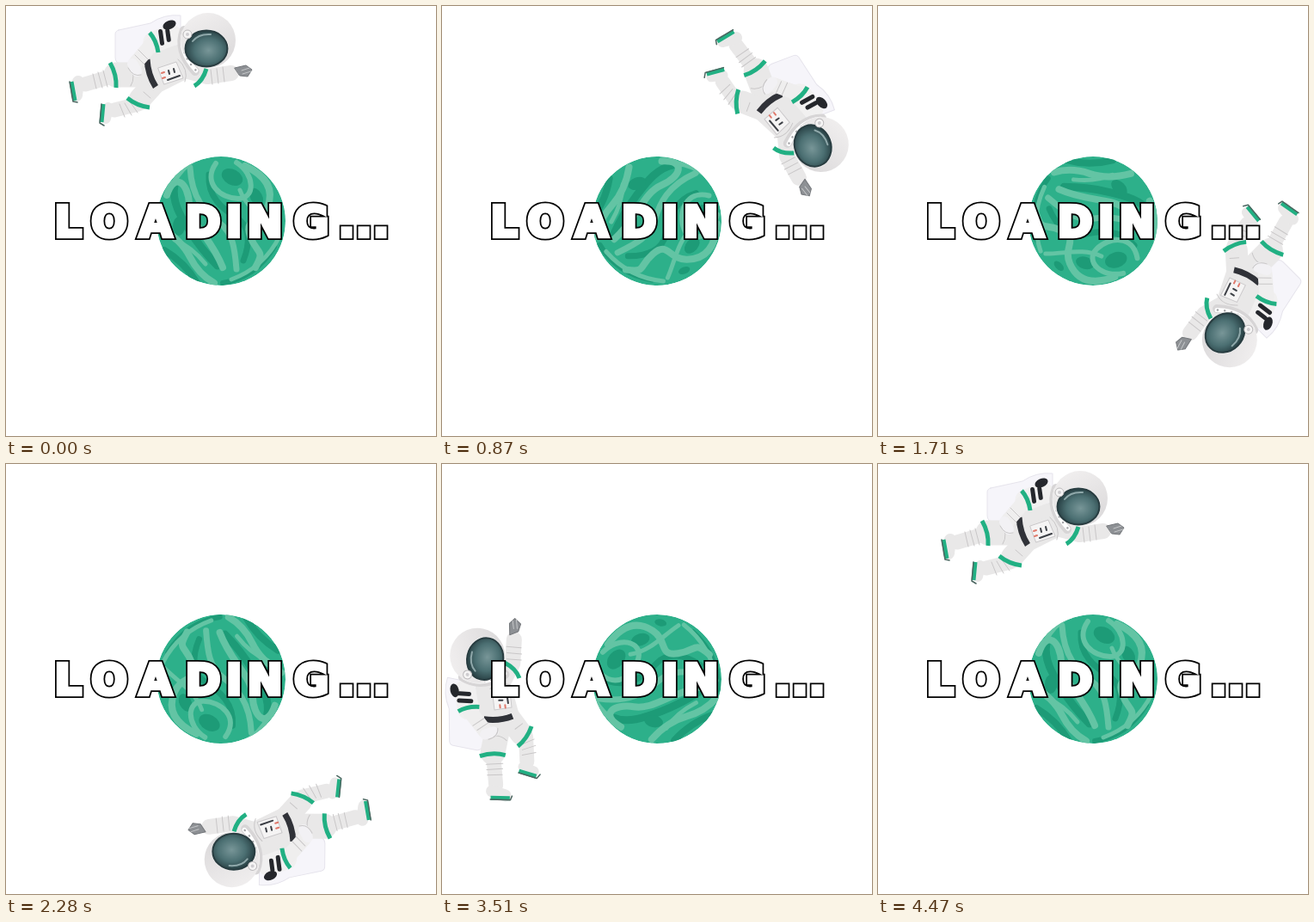
An HTML page for the animation above (4.5 s loop, 500 by 500 pixels).

```html
<!DOCTYPE html>
<html lang="en">
<head>
<meta charset="utf-8">
<title>Loading</title>
<style>
  html, body { margin: 0; width: 100%; height: 100%; overflow: hidden; background: #fff; }
  svg { display: block; width: 100%; height: 100%; }
  path, line { fill: none; stroke-linecap: round; stroke-linejoin: round; }
  text { font: bold 49px "DejaVu Sans", sans-serif; text-anchor: middle; stroke-linejoin: miter; }
  .light path { stroke: #63c4a4; }
  .dark path { stroke: #1d9b77; }
  .dark ellipse { fill: #1d9b77; }
  .suit path { stroke: #e9e8e8; }
  .shade path { stroke: #c9c7c8; stroke-width: 1; }
  .band path { stroke: #21b083; stroke-width: 5; stroke-linecap: butt; }
  .black { fill: #25272c; }
</style>
</head>
<body>
<svg viewBox="0 0 500 500">
  <defs>
    <clipPath id="disc"><circle cx="250" cy="250" r="75"/></clipPath>
    <radialGradient id="glass" cx=".55" cy=".55" r=".6">
      <stop offset="0" stop-color="#789698"/>
      <stop offset=".55" stop-color="#4b6f72"/>
      <stop offset="1" stop-color="#22383c"/>
    </radialGradient>
    <linearGradient id="shell" x2=".5" y2="1">
      <stop offset="0" stop-color="#f3f1f1"/>
      <stop offset="1" stop-color="#dddbdc"/>
    </linearGradient>
  </defs>

  <g id="orbit">
    <g clip-path="url(#disc)">
      <circle cx="250" cy="250" r="75" fill="#2db08a"/>
      <g class="dark">
        <path d="M196 208C192 228 204 246 214 262S236 292 246 302" stroke-width="9"/>
        <path d="M236 196C234 222 252 236 268 246S284 276 276 296" stroke-width="7"/>
        <path d="M184 284Q208 298 222 322" stroke-width="8"/>
        <path d="M252 322Q290 316 312 280" stroke-width="6"/>
        <ellipse cx="263" cy="199" rx="13" ry="9" transform="rotate(28 263 199)"/>
        <ellipse cx="291" cy="222" rx="7" ry="11" transform="rotate(-28 291 222)"/>
        <ellipse cx="201" cy="256" rx="7" ry="11"/>
        <ellipse cx="315" cy="241" rx="4" ry="7"/>
      </g>
      <g class="light">
        <path d="M187 220C196 192 212 206 213 230S238 268 252 304" stroke-width="8"/>
        <path d="M214 188C216 224 232 240 248 252S266 282 268 306" stroke-width="7"/>
        <path d="M244 183C228 206 250 224 270 224S290 196 268 182" stroke-width="6"/>
        <path d="M278 186C304 198 312 214 304 234S276 246 284 268S302 282 290 304" stroke-width="8"/>
        <path d="M272 214C280 236 300 246 316 262" stroke-width="5"/>
        <path d="M180 258Q204 272 214 292T242 322" stroke-width="8"/>
        <path d="M196 272Q216 280 232 300" stroke-width="5"/>
        <path d="M222 176Q202 190 196 204" stroke-width="6"/>
        <path d="M262 318Q300 304 318 268" stroke-width="5"/>
      </g>
    </g>

    <!-- backpack -->
    <path d="M131 28L168 20Q184 9 203 11V58L136 68Q127 67 127 60V33Q127 29 131 28Z"
      style="fill:#f6f5fa" stroke="#e6e4ec"/>

    <!-- limbs and torso -->
    <g class="suit">
      <path d="M166 80L128 80" stroke-width="29"/>
      <path d="M126 81L92 91" stroke-width="17"/>
      <path d="M84 88L82 104" stroke-width="14"/>
      <path d="M174 88L156 108" stroke-width="26"/>
      <path d="M154 114L126 121" stroke-width="17"/>
      <path d="M119 118L116 131" stroke-width="12"/>
      <path d="M212 76L234 82L262 78" stroke-width="18"/>
      <path d="M166 62L204 52L206 78L178 92Z" stroke-width="16" style="fill:#e9e8e8"/>
    </g>
    <g class="shade">
      <path d="M113 75L118 94M107 77L112 95M101 79L105 96M144 111L153 124M138 113L146 127M132 114L138 129
        M238 74L240 91M245 73L247 90M252 71L254 88M143 68Q152 82 145 93M160 100L168 107M200 62Q213 74 208 88"/>
    </g>
    <g class="band">
      <path d="M121 66Q129 80 128 95"/>
      <path d="M141 107Q152 116 167 118"/>
      <path d="M76 88L80 110M113 114L111 135"/>
      <path d="M219 93Q229 87 233 73"/>
    </g>
    <path d="M74 88L78 111L83 112M111 114L109 136L114 139" stroke="#4b6660" stroke-width="1.5"/>
    <path d="M266 72L279 69L286 74L281 82L272 81Z" style="fill:#8d9094" stroke="#74777b"/>
    <path d="M274 75L283 72M275 79L285 76" stroke="#c5c7c9"/>

    <!-- belt and chest panel -->
    <path d="M164 62Q165 80 174 94" stroke="#303238" stroke-width="7" style="stroke-linecap:butt"/>
    <path d="M177 72L198 65L206 84L184 91Z" style="fill:#f5f4f4" stroke="#cbc9cb"/>
    <path d="M181 78L184 77M182 84L185 83" stroke="#e07a6c" stroke-width="2"/>
    <path d="M189 75L190 79M195 73L196 77M188 86L202 81" stroke="#3c3f45" stroke-width="2"/>

    <!-- near arm -->
    <g class="suit">
      <path d="M192 34L172 42" stroke-width="25" style="stroke:#f1f0f0"/>
      <path d="M170 44L151 66" stroke-width="17" style="stroke:#efeeee"/>
      <path d="M147 67L152 76" stroke-width="12" style="stroke:#f2f1f4"/>
    </g>
    <g class="shade"><path d="M154 51L165 62M150 57L161 68M142 72Q148 83 157 80"/></g>
    <g class="band"><path d="M167 31Q175 40 177 54"/></g>
    <ellipse class="black" cx="190" cy="22" rx="8" ry="5" transform="rotate(-24 190 22)"/>
    <rect class="black" x="178" y="27" width="5" height="19" rx="2.5" transform="rotate(-8 180 36)"/>
    <rect class="black" x="186" y="26" width="5" height="16" rx="2.5" transform="rotate(-8 188 34)"/>

    <!-- helmet -->
    <path d="M207 28Q198 52 220 76" stroke="#d7d5d6" stroke-width="10"/>
    <path d="M207 30Q200 53 221 75" stroke="#fff" stroke-width="5"/>
    <path d="M207 30Q200 53 221 75" stroke="#a5a5a8" stroke-width="2.5" stroke-dasharray=".1 8"/>
    <ellipse cx="235" cy="40" rx="32" ry="32" fill="url(#shell)"/>
    <ellipse cx="233" cy="49" rx="26" ry="22" fill="#f3f2f2"/>
    <ellipse cx="233" cy="49.5" rx="24.5" ry="21" fill="url(#glass)" stroke="#283c40" stroke-width="2"/>
    <path d="M217 41Q224 32 238 33" stroke="#8fa8aa" stroke-width="2"/>
    <circle cx="211" cy="33" r="5" fill="#f6f5f5" stroke="#bcbabc"/>
    <circle cx="211" cy="33" r="2" fill="#cfcdd0"/>
  </g>

  <text y="267.5" x="72 120 174 229 265 301 355 396 416 436" fill="#fff" stroke="#000" stroke-width="8">LOADING...</text>
  <text y="267.5" x="72 120 174 229 265 301 355 396 416 436" fill="#fff" stroke="#fff" stroke-width="4.5">LOADING...</text>
</svg>
<script>
  const LOOP = 4500, STEP = 30, LAST = LOOP / STEP - 1;
  const orbit = document.getElementById('orbit');

  function draw() {
    const turn = Math.floor(performance.now() % LOOP / STEP) / LAST;
    // one revolution that lags slightly halfway round
    const angle = 360 * turn - 3 * Math.sin(Math.PI * turn) ** 2;
    orbit.setAttribute('transform', `rotate(${angle} 250 250)`);
    requestAnimationFrame(draw);
  }
  draw();
</script>
</body>
</html>
```
